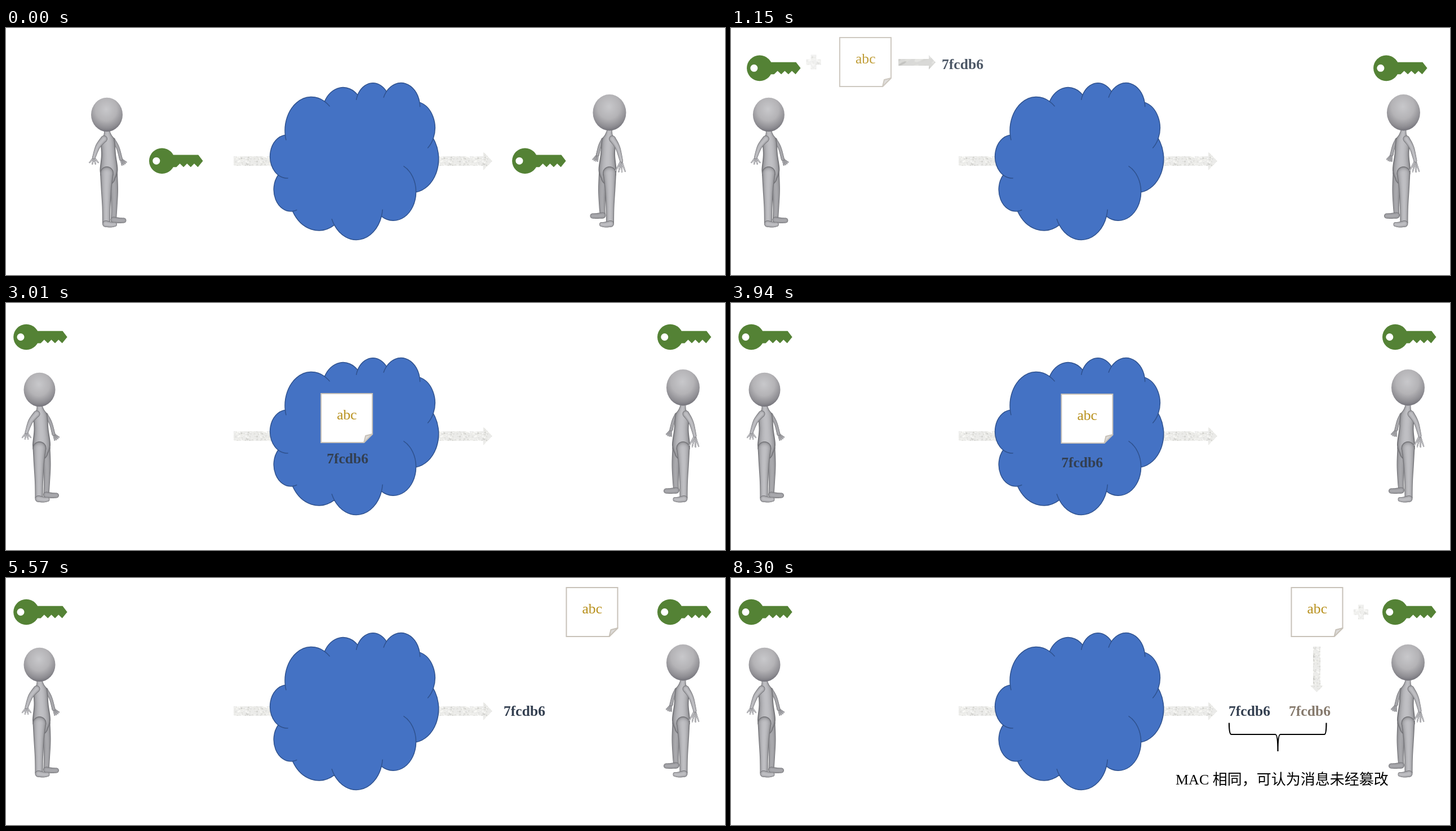
Animation of 1276x439 px, one loop 9460 ms. Source, as an HTML page:

```html
<!DOCTYPE html>
<html lang="zh-CN">
<head>
<meta charset="utf-8">
<title>Message authentication</title>
<style>
html, body { margin: 0; width: 100%; height: 100%; overflow: hidden; background: #fff; }
svg { display: block; width: 100%; height: 100%; }
text { font-family: "Liberation Serif", "Noto Sans CJK SC", "Noto Sans CJK", serif; font-size: 25.6px; }
.hash { font-weight: bold; fill: #333f50; }
</style>
</head>
<body>
<svg viewBox="0 0 1276 439">
  <defs>
    <radialGradient id="ball" cx=".48" cy=".34" r=".68">
      <stop offset="0" stop-color="#c8c8cb"/>
      <stop offset=".5" stop-color="#b4b3b6"/>
      <stop offset=".82" stop-color="#8f8e93"/>
      <stop offset="1" stop-color="#6f6e76"/>
    </radialGradient>
    <pattern id="grain" width="60" height="40" patternUnits="userSpaceOnUse">
      <g id="specks"><rect width="60" height="40" fill="#ebebe9"/></g>
    </pattern>
    <pattern id="marble" width="60" height="40" patternUnits="userSpaceOnUse"
      patternTransform="rotate(-28) scale(6 2.4)">
      <use href="#specks"/>
    </pattern>
    <g id="key" fill="#548235">
      <path id="blade"/>
      <circle cx="23" cy="23" r="22.800"/>
      <circle cx="13" cy="23" r="6.500" fill="#fff"/>
    </g>
    <path id="plus" d="M-5-13H5V-5H13V5H5V13H-5V5H-13V-5H-5Z" fill="url(#grain)" opacity=".8"/>
  </defs>

  <path d="M404 228H847V220L863 236.500 847 253V245H404Z" fill="url(#grain)"/>
  <g id="cloud" stroke="#2f528f" stroke-width="1.500" stroke-linejoin="round"></g>
  <g id="left"></g>
  <g id="right"></g>
  <use id="keyL" href="#key"/>
  <use id="keyR" href="#key"/>

  <g id="first">
    <use href="#plus" x="146.500" y="60.500"/>
    <path d="M297 55H351V48L363 61 351 74V67H297Z" fill="url(#marble)" style="filter:brightness(.9)"/>
  </g>

  <g id="doc" stroke="#c8c2b9" stroke-width="2">
    <path d="M0 0H91V72L76 87H0Z" fill="#fff"/>
    <path d="M76 87L79 75 91 72Z" fill="#dcdad8" stroke-linejoin="round"/>
    <text x="28" y="46" fill="#b8901c" stroke="none">abc</text>
  </g>
  <text id="hash" class="hash">7fcdb6</text>

  <g id="check">
    <use href="#plus" x="1118" y="60.500"/>
    <path d="M1033 122H1046V191H1051L1039.500 203 1028 191H1033Z" fill="url(#grain)"/>
    <text class="hash" x="990" y="245" style="fill:#85796c">7fcdb6</text>
  </g>

  <g id="verdict">
    <path d="M884 257.500Q884 278 888 278H966Q970.500 278 970.500 308 970.500 278 975 278H1053Q1056.500 278 1056.500 257.500" fill="none" stroke="#000" stroke-width="2.200"/>
    <text x="789" y="367" style="font-size:26px">MAC 相同，可认为消息未经篡改</text>
  </g>
</svg>
<script>
const $ = id => document.getElementById(id);
const LOOP = 9460;
const clamp = v => Math.min(1, Math.max(0, v));
const mix = (a, b, p) => a + (b - a) * p;

function add(parent, tag, attrs) {
  const el = document.createElementNS("http://www.w3.org/2000/svg", tag);
  for (const k in attrs) el.setAttribute(k, attrs[k]);
  parent.appendChild(el);
}

// Stone texture
let seed = 7;
const rnd = () => (seed = seed * 16807 % 2147483647) / 2147483647;
for (let i = 0; i < 330; i++) {
  const v = Math.round(mix(196, 262, rnd()));
  add($("specks"), "ellipse", {
    cx: rnd() * 60, cy: rnd() * 40, rx: .7 + rnd() * 1.3, ry: .7 + rnd() * 1.1,
    fill: `rgb(${v},${v},${v - 4})`, opacity: .75
  });
}

// Key blade with three notches
$("blade").setAttribute("d", "M40 12.300H87.500L95.700 23 86.700 34" + "l-6.500-6.200-6.200 6.200".repeat(3) + "H38Z");

// Cloud: lobes of one aspect between cusps. Each cusp has the radius of the next lobe
// and a crease in degrees: the previous lobe runs on (+) or the next begins early (-).
const ASPECT = 1.2735;
const cusps = [
  [495.5, 190.2, 46.9, -9], [565.5, 130.6, 37, 14], [624.1, 119.1, 30.3, -14],
  [675.2, 112.9, 33.7, -17], [734, 132.1, 37, 11], [758.2, 196.4, 47, 26],
  [727.6, 291.8, 40.2, -64], [666.3, 334.7, 46.9, -12], [582.7, 350.2, 53.6, 12],
  [508.7, 325.6, 30.3, -15], [483.1, 261.3, 30.2, -35]
];
const arcTo = (r, x, y) => `A${r} ${r * ASPECT} 0 0 1 ${x} ${y}`;

function lobeCentre([ax, ay, r], [bx, by]) {
  const dx = bx - ax, dy = (by - ay) / ASPECT, d = Math.hypot(dx, dy);
  const h = Math.sqrt(Math.max(0, r * r - d * d / 4)) / d;
  return [(ax + bx) / 2 - h * dy, (ay + by) / 2 + h * dx * ASPECT];
}

function buildCloud() {
  const n = cusps.length;
  let edge = `M${cusps[0][0]} ${cusps[0][1]}`, folds = "";
  cusps.forEach((cusp, i) => {
    const next = cusps[(i + 1) % n], prev = cusps[(i + n - 1) % n];
    const [x, y, , turn] = cusp;
    edge += arcTo(cusp[2], next[0], next[1]);
    const r = turn > 0 ? prev[2] : cusp[2];
    const [cx, cy] = turn > 0 ? lobeCentre(prev, cusp) : lobeCentre(cusp, next);
    const a = Math.atan2((y - cy) / ASPECT, x - cx) + turn * Math.PI / 180;
    const end = [cx + r * Math.cos(a), cy + r * ASPECT * Math.sin(a)];
    const [p, q] = turn > 0 ? [[x, y], end] : [end, [x, y]];
    folds += `M${p[0]} ${p[1]}` + arcTo(r, q[0], q[1]);
  });
  add($("cloud"), "path", { d: edge + "Z", fill: "#4472c4" });
  add($("cloud"), "path", { d: folds, fill: "none" });
}

// Smooth curve through [x, y, radius] points
function smooth(pts, steps = 6) {
  const out = [], last = pts.length - 1;
  for (let i = 0; i <= last * steps; i++) {
    const k = Math.min(last - 1, Math.floor(i / steps)), t = i / steps - k;
    const [a, b, c, d] = [-1, 0, 1, 2].map(o => pts[Math.min(last, Math.max(0, k + o))]);
    out.push(b.map((v, j) => v + t / 2 * (c[j] - a[j]
      + t * (2 * a[j] - 5 * v + 4 * c[j] - d[j] + t * (3 * (v - c[j]) + d[j] - a[j])))));
  }
  return out;
}

const dot = (x, y, r) => `M${x - r} ${y}a${r} ${r} 0 1 1 ${2 * r} 0a${r} ${r} 0 1 1 ${-2 * r} 0Z`;

// A tapered round limb, shaded like a tube from rim to middle
function limb(parent, pts, light) {
  const line = smooth(pts), last = line.length - 1, layers = 8;
  for (let k = 0; k < layers; k++) {
    const d = 1 - k / layers;
    const side = s => line.map(([x, y, r], i) => {
      const p = line[Math.max(0, i - 1)], q = line[Math.min(last, i + 1)];
      const dx = q[0] - p[0], dy = q[1] - p[1], w = s * d * r / Math.hypot(dx, dy);
      return `${x - dy * w} ${y + dx * w}`;
    });
    const ends = [line[0], line[last]].map(([x, y, r]) => dot(x, y, r * d)).join("");
    const v = Math.round(mix(116, light, Math.sqrt(1 - d * d)));
    const fill = `rgb(${v},${v},${v + 4})`;
    add(parent, "path", { d: "M" + side(1).concat(side(-1).reverse()).join("L") + "Z", fill });
    add(parent, "path", { d: ends, fill });
  }
}

// A mannequin seen from the side; x runs away from the near arm, dir mirrors it
function person(id, { cx, dir, head, near, far, farFoot }) {
  const g = $(id), NEAR = 192, FAR = 170;
  const part = (pts, light) => limb(g, pts.map(([x, y, r]) => [cx + dir * x, y, r]), light);
  const arm = (x, y, r, hand, light) => {
    const [hx, hy, from, to, len] = hand;
    for (let i = 0; i < 4; i++) {
      const a = mix(from, to, i / 3) * Math.PI / 180;
      part([[hx, hy, 1.8], [hx + len * Math.cos(a), hy + len * Math.sin(a), 1]], light);
    }
    part([[x, y, r], [mix(x, hx, .6), mix(y, hy, .4), r * .75], [hx, hy, 3]], light);
  };
  arm(11, 199, 4, far, FAR);
  part([[10, 258, 9], [13, 288, 7], [13, 318, 5.5], [12, farFoot, 5]], FAR);
  part([[12, farFoot, 5.5], [22, farFoot + 1, 5], [30, farFoot + 1, 4.5]], FAR);
  part([[0, 183, 5], [1, 190, 7], [1.5, 200, 12.5], [3, 225, 13], [3.5, 252, 16], [2, 266, 13]], NEAR);
  part([[0, 258, 12], [-1, 285, 9.5], [-1, 318, 7.5], [-1, 346, 7]], NEAR);
  part([[-2, 348, 6], [8, 349.5, 5], [14, 349, 4]], NEAR);
  arm(-5, 197, 6, near, NEAR);
  add(g, "ellipse", { cx, cy: head[0], rx: head[1], ry: head[2], fill: "url(#ball)" });
}

buildCloud();
// Hands are x, y, first and last finger angle, finger length
person("left", {
  cx: 179, dir: 1, head: [154, 28, 30.2],
  near: [-23, 230, 130, 50, 12], far: [25, 233, 30, 80, 11], farFoot: 341
});
person("right", {
  cx: 1071, dir: -1, head: [150.2, 29.5, 32.2],
  near: [-21, 236, 110, 60, 20], far: [21, 225, 45, 90, 12], farFoot: 333
});

// cubic-bezier(.25, .1, .25, 1)
function ease(x) {
  let lo = 0, hi = 1, s = .5;
  for (let i = 0; i < 24; i++) {
    s = (lo + hi) / 2;
    if (.75 * s * (1 - s) + s ** 3 < x) lo = s; else hi = s;
  }
  return x >= 1 ? 1 : x <= 0 ? 0 : .3 * s * (1 - s) ** 2 + 3 * s * s * (1 - s) + s ** 3;
}

// Progress of a move, advanced in steps of about 13 per second
function progress(t, first, start, length, step) {
  const n = Math.floor((t - first + 12) / step);
  return n < 0 ? 0 : clamp((first + n * step - start) / length);
}

function place(id, x, y) { $(id).setAttribute("transform", `translate(${x} ${y})`); }
function fade(id, o) { $(id).setAttribute("opacity", clamp(o)); }
function travel(id, [a, b, c], p, q) {
  place(id, ...[0, 1].map(i => mix(mix(a[i], b[i], p), c[i], q)));
}

function draw(t) {
  const part = ease(progress(t, 460, 470, 990, 77.5));
  const send = ease(progress(t, 2240, 2262, 990, 77));
  const deliver = ease(progress(t, 3940, 3893, 990, 77.5));

  place("left", -119.5 * part, 0);
  place("right", 130.5 * part, 0);
  const keyY = mix(213.2, 37.5, part);
  place("keyL", mix(253.8, 13, part), keyY);
  place("keyR", mix(898, 1155.8, part), keyY);

  travel("doc", [[193, 17], [573.5, 166.6], [994.5, 17]], send, deliver);
  travel("hash", [[374, 73], [576.8, 293.4], [883, 245]], send, deliver);
  const shown = 2 * part - 1;
  fade("doc", shown);
  fade("hash", shown);
  fade("first", Math.min(shown, 1 - 2 * send));
  fade("check", progress(t, 6040, 5975, 300, 77.5));
  fade("verdict", progress(t, 7750, 7680, 480, 80));
}

const begin = performance.now();
function tick() {
  draw((performance.now() - begin) % LOOP);
  requestAnimationFrame(tick);
}
tick();
</script>
</body>
</html>
```
